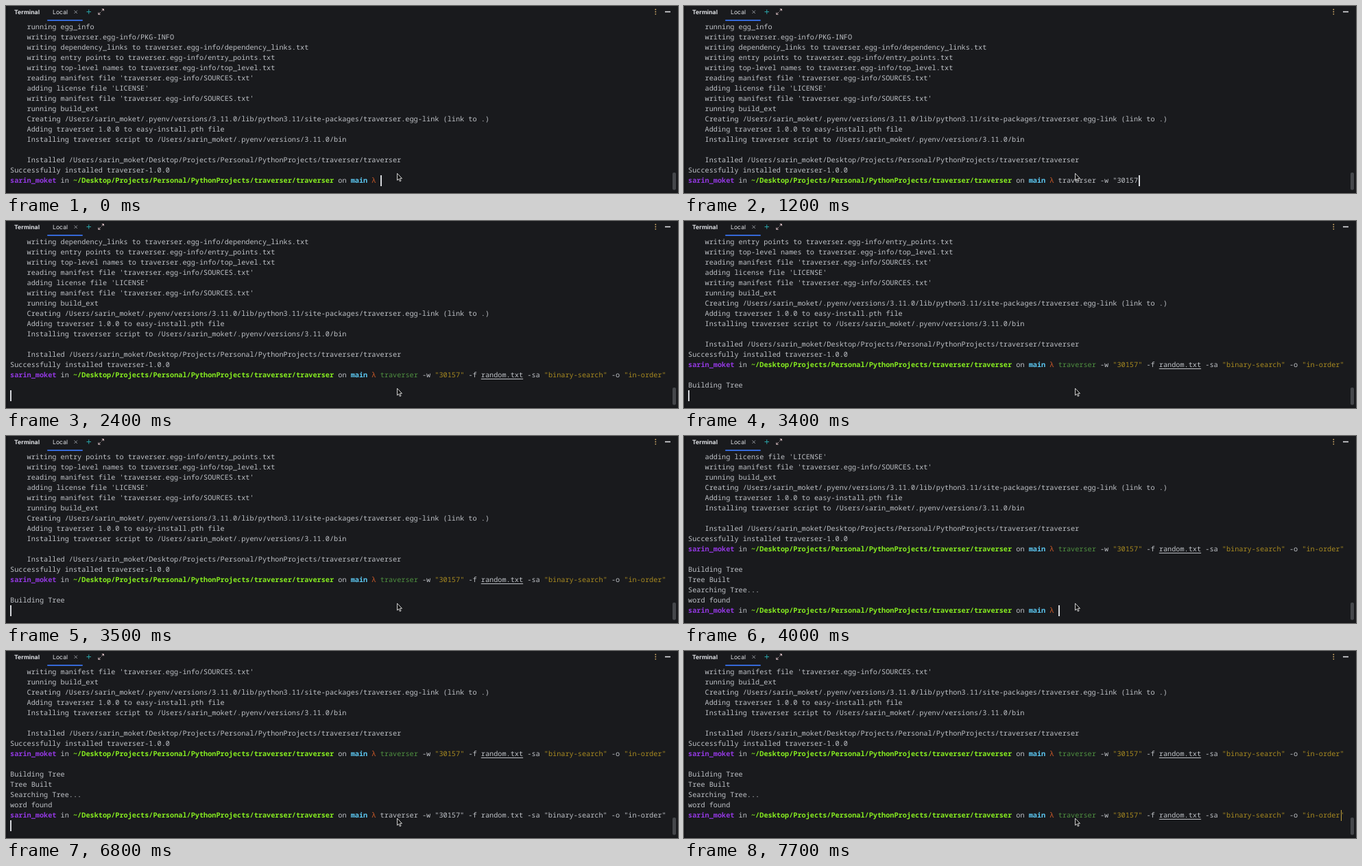
Write an HTML page that moves like this. It is 980 px wide and 274 px high and loops after 8000 ms.

```html
<!DOCTYPE html>
<html lang="en">
<head>
<meta charset="utf-8">
<title>Terminal</title>
<style>
  html, body { margin: 0; width: 100%; height: 100%; overflow: hidden; background: #191a1d; }
  #stage { position: relative; width: 980px; height: 274px; overflow: hidden; }
  svg, #screen, #caret { position: absolute; }
  svg { left: 0; top: 0; font: 8.7px Inter, sans-serif; fill: #dfe1e5; text-rendering: geometricPrecision; }
  #screen {
    left: 6px; top: 22.5px; margin: 0; color: #bfc2c7;
    font: 10.235px/15px "Noto Sans Mono", monospace;
    text-rendering: geometricPrecision; font-variant-ligatures: none;
  }
  #screen div { height: 15px; white-space: pre; }
  #caret { width: 1.5px; height: 16px; background: #d5d7db; }
  .user { color: #9238e0; }
  .path { color: #87ee20; }
  .branch { color: #5cc8f2; }
  .mark { color: #cf5b28; }
  .cmd { color: #4f9140; }
  .str { color: #a88a20; }
  u { text-underline-offset: 2px; }
</style>
</head>
<body>
<div id="stage">
  <pre id="screen"></pre>
  <div id="caret"></div>
  <svg width="980" height="274">
    <path d="M0 0H2.5V274H0ZM0 272.5H980V274H0Z" fill="#151619"/>
    <text x="12" y="12" font-weight="700">Terminal</text>
    <text x="68" y="12">Local</text>
    <rect x="60" y="20" width="52" height="2" rx="1" fill="#3569d8"/>
    <g fill="none" stroke-width="1">
      <path d="M99.5 6.5l4.5 4.5m0-4.5l-4.5 4.5" stroke="#8d9096"/>
      <path d="M117.5 8.5h6.5m-3.25-3.25v6.5" stroke="#2aa5a8"/>
      <path d="M139.5 7.5l3-3m-2.7 0h2.7v2.7M137.8 9.3l-3 3m0-2.7v2.7h2.7" stroke="#d3b9bd"/>
      <path d="M961 8.5h8" stroke="#dfe1e5" stroke-width="1.6"/>
    </g>
    <g fill="#d9b06c">
      <circle cx="947.3" cy="5.2" r=".9"/><circle cx="947.3" cy="8.5" r=".9"/><circle cx="947.3" cy="11.8" r=".9"/>
    </g>
    <rect x="972" y="244" width="5" height="25.5" rx="2" fill="#45474b"/>
    <path d="M570.5 245.2v10.2l2.3-2.1 1.5 3.6 1.7-.7-1.5-3.5h3z" fill="#111" stroke="#e4e4e4" stroke-width=".9"/>
  </svg>
</div>
<script>
const LOOP = 8000, ROWS = 16, COL = 6.141, LINE = 15;
const user = 'sarin_moket', project = 'Desktop/Projects/Personal/PythonProjects/traverser/traverser';
const home = '/Users/' + user, py = home + '/.pyenv/versions/3.11.0';
const span = (kind, text) => `<span class="${kind}">${text}</span>`;
const bold = (kind, text) => `<b class="${kind}">${text}</b>`;

const log = [
  'running egg_info',
  'writing traverser.egg-info/PKG-INFO',
  'writing dependency_links to traverser.egg-info/dependency_links.txt',
  'writing entry points to traverser.egg-info/entry_points.txt',
  'writing top-level names to traverser.egg-info/top_level.txt',
  "reading manifest file 'traverser.egg-info/SOURCES.txt'",
  "adding license file 'LICENSE'",
  "writing manifest file 'traverser.egg-info/SOURCES.txt'",
  'running build_ext',
  `Creating ${py}/lib/python3.11/site-packages/traverser.egg-link (link to .)`,
  'Adding traverser 1.0.0 to easy-install.pth file',
  `Installing traverser script to ${py}/bin`,
  '',
  `Installed ${home}/${project}`
].map(s => '    ' + s).concat('Successfully installed traverser-1.0.0');

const prompt = `${bold('user', user)} in ${bold('path', '~/' + project)} on ${bold('branch', 'main')} ${span('mark', 'λ')} `;
const command = 'traverser -w "30157" -f random.txt -sa "binary-search" -o "in-order"';
const raw = prompt + command;
const lit = prompt + command
  .replace(/"[^"]*"|^traverser|random\.txt/g, s =>
    s[0] === '"' ? span('str', s) : s[0] === 't' ? span('cmd', s) : `<u>${s}</u>`);
const done = [lit, '', 'Building Tree', 'Tree Built', 'Searching Tree...', 'word found'];

// start time, lines after the log, caret column, caret row
const stages = [
  [0, [prompt], 88],
  [1000, [prompt + command.slice(0, 19)], 107],
  [1500, [raw, ''], 0],
  [2400, [lit, '', ''], 0],
  [3400, [...done.slice(0, 3), ''], 0],
  [3600, [...done, ''], 0],
  [3700, [...done, prompt], 88],
  [6700, [...done, raw, ''], 0],
  [7300, [...done, lit, ''], 155, 14]
];
const blinks = [800, 1000, 2900, 3400, 4100, 4600, 5100, 5700, 6200, 6700];

const screen = document.getElementById('screen'), caret = document.getElementById('caret');
let shown;

function show(stage) {
  const [, tail, col, row = ROWS - 1] = stage;
  screen.innerHTML = [...log, ...tail].slice(-ROWS).map(s => `<div>${s}</div>`).join('');
  caret.style.left = 6 + col * COL + 'px';
  caret.style.top = 23 + row * LINE + 'px';
  caret.style.background = col === 155 ? '#c0a03c' : '';
  shown = stage;
}

const start = performance.now();
function draw() {
  const t = (performance.now() - start) % LOOP;
  const stage = stages.filter(s => s[0] <= t).pop();
  if (stage !== shown) show(stage);
  caret.hidden = blinks.filter(b => b <= t).length % 2 === 1;
  requestAnimationFrame(draw);
}
draw();
</script>
</body>
</html>
```
